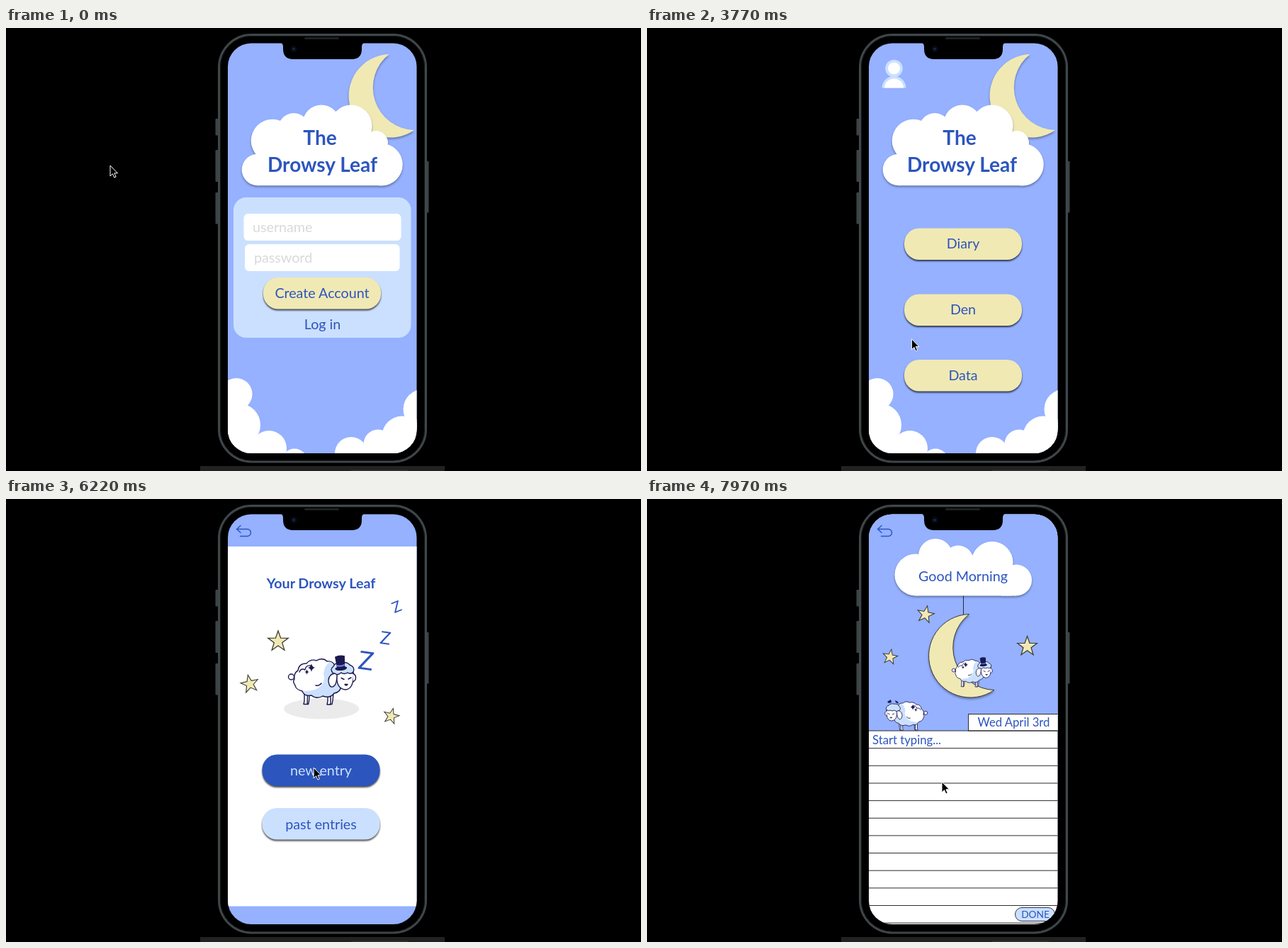
An HTML page for the animation above (8000 ms loop, 896x625 px).

```html
<!DOCTYPE html>
<html lang="en">
<head>
<meta charset="utf-8">
<title>Sleep journal prototype</title>
<style>
html, body { margin: 0; width: 100%; height: 100%; overflow: hidden; background: #000; }
svg { display: block; width: 896px; height: 625px; }
text { font: 19.7px Lato, sans-serif; fill: #2c55be; }
.mid { text-anchor: middle; }
.title { font-size: 28px; font-weight: 700; }
.small { font-size: 16.7px; }
.sky { fill: #95b1ff; }
.pale { fill: #cbe0ff; }
.cream { fill: #f1e9b4; }
.cloud { fill: #fff; }
.soft { filter: drop-shadow(0 2px 1.5px rgba(0, 0, 0, .35)); }
.btn rect { width: 166px; height: 44.5px; rx: 21px; fill: #f1e9b4; filter: drop-shadow(0 2px 1px rgba(0, 0, 0, .7)); }
.btn text { text-anchor: middle; }
.btn.hover rect { fill: #9747ff; }
.btn.hover text { fill: #f5ecd8; }
.btn.light rect { fill: #cbe0ff; }
.btn.light.hover rect { fill: #2c55be; }
.btn.light.hover text { fill: #cbe0ff; }
.hint { fill: #d9d9d9; }
.ink { fill: none; stroke: #1b1950; stroke-width: 1.4; stroke-linecap: round; stroke-linejoin: round; }
.star { fill: #f1e9b4; stroke: #3a3a34; stroke-width: .085; }
.rule { stroke: #2b2b33; stroke-width: 1; }
</style>
</head>
<body>
<svg viewBox="0 0 896 625" xmlns="http://www.w3.org/2000/svg">
  <defs>
    <clipPath id="glass"><rect x="313" y="21.5" width="266.5" height="578.5" rx="33"/></clipPath>
    <path id="moon" d="M540.5 37A58.800 58.800 0 1 0 576 144A60 60 0 0 1 540.5 37Z"/>
    <polygon id="star" points="0,-1 .24,-.32 .95,-.31 .38,.12 .59,.81 0,.4 -.59,.81 -.38,.12 -.95,-.31 -.24,-.32"/>
    <path id="back" d="M331 37.5L325.5 42.5L331 47.5M326 42.5H340.5a5 5 0 0 1 0 10H330.5" fill="none" stroke="#2c55be" stroke-width="1.4" stroke-linecap="round"/>
    <path id="fleece" d="M407 254q-1-9 5-12q1-10 12-10q6-7 14-4q9-5 15 1q8-1 11 6L474 262q-2 11-11 12q-6 8-16 4q-9 5-16-1q-10 2-13-6q-9-2-10-8q-4-5-1-9Z"/>
    <g id="sheep">
      <g class="ink" style="fill:#fff">
        <path d="M421 275v10l-1 4.500h5l.5-12M428 277l-.5 8-1 4.500h-2M454 276v9l-1 5h5v-13M462 274l-1 10-1 5.500h-3"/>
        <circle cx="402.5" cy="251" r="4"/>
      </g>
      <use href="#fleece" fill="#fff"/>
      <path class="pale" d="M419 271q17 1 26-8q6-8 3-16q1-12 9-17l7 5L474 262q-2 11-11 12q-6 8-16 4q-9 5-16-1q-8 1-12-6Z"/>
      <use href="#fleece" class="ink"/>
      <path class="ink" d="M414 244q2-6 8-3q1-7 8-6M437 263q5 1 8-3"/>
      <path fill="#1b1950" d="M431 232q.8 5 5 6q-4.200 1-5 6q-.8-5-5-6q4.200-1 5-6ZM424.500 240q.5 3.500 3 4q-2.500.5-3 4q-.5-3.500-3-4q2.500-.5 3-4Z"/>
      <path class="ink" style="fill:#fff" d="M467 242q-3 26 12 27q13-1 11-27Z"/>
      <path class="ink" style="fill:#cbe0ff" d="M462 246q-6-5 0-10q3-6 10-5q9-2 13 3q8 3 5 10q-4 4-8 1q-5 3-9 0q-6 5-11 1Z"/>
      <path class="ink" style="fill:#fff" d="M464 246q-9 1-9 11q1 9 6 8q6-2 6-17ZM489 246q6 2 4 9l-3 3"/>
      <path class="ink" d="M473 252.500l4 2M487 252l-4 2M478 261.500q2 3 4 0Z"/>
    </g>
    <g id="hat" fill="#1b1950" transform="rotate(-6 472 232)">
      <ellipse cx="472" cy="239" rx="8.5" ry="3"/>
      <path d="M465 222q7-3 14 0l-1.500 16h-11Z"/>
      <path d="M466.500 234.500q5.500 2.500 11 0" fill="none" stroke="#6f86ea" stroke-width="2"/>
    </g>
    <g id="night">
      <rect class="sky" x="312" y="20" width="269" height="582"/>
      <use href="#moon" class="cream soft"/>
      <g class="cloud">
        <circle cx="325" cy="516.5" r="22.5"/><circle cx="329" cy="560" r="30"/>
        <circle cx="371" cy="593" r="25"/><circle cx="407" cy="612" r="18.5"/>
        <path d="M312 516h20l20 60v26h-40Z"/>
        <circle cx="589" cy="538" r="28.5"/><circle cx="559" cy="576" r="28.5"/>
        <circle cx="525" cy="587" r="20.5"/><circle cx="487" cy="600" r="23"/>
        <path d="M500 592h30l40-40h12v50h-82Z"/>
      </g>
      <g class="cloud soft">
        <circle cx="355" cy="200" r="22.3"/><circle cx="530" cy="192.7" r="29.7"/>
        <circle cx="376" cy="159" r="30.3"/><circle cx="406" cy="142" r="22"/>
        <circle cx="445" cy="135" r="26.5"/><circle cx="487" cy="138" r="29.5"/>
        <circle cx="522" cy="162" r="17"/>
        <path d="M355 185L376 150H510L530 180V222.3H355Z"/>
      </g>
    </g>
  </defs>

  <rect width="896" height="625"/>
  <g fill="#3c4346">
    <rect x="295.5" y="128" width="4" height="23.5" rx="1"/>
    <rect x="295.5" y="172" width="4" height="45" rx="1"/>
    <rect x="295.5" y="232" width="4" height="44.5" rx="1"/>
    <rect x="592.5" y="188" width="4" height="72.5" rx="1"/>
  </g>
  <rect x="300.5" y="9.5" width="292" height="602.5" rx="46" stroke="#3f4749" stroke-width="3"/>
  <rect x="302.5" y="11.5" width="288" height="598.5" rx="44" fill="none" stroke="#14181a"/>
  <rect x="274" y="618" width="345" height="7" fill="#222"/>
  <rect x="487" y="623.5" width="80" height="2" fill="#333"/>

  <g clip-path="url(#glass)">
    <g id="login">
      <use href="#night"/>
      <text class="title mid" x="443" y="165">The</text>
      <text class="title mid" x="446.5" y="203">Drowsy Leaf</text>
      <rect x="321" y="239" width="250.5" height="198" rx="18" class="pale"/>
      <g id="blank">
        <rect class="cloud" x="335.5" y="262" width="222" height="38" rx="6"/>
        <rect class="cloud" x="337" y="305" width="218.5" height="38" rx="6"/>
        <text class="hint" x="348" y="288">username</text>
        <text class="hint" x="350" y="331">password</text>
        <text class="mid" x="446.5" y="425">Log in</text>
      </g>
      <g id="filled">
        <rect class="cloud" x="337.5" y="262" width="217" height="38" rx="6"/>
        <rect class="cloud" x="337.5" y="305" width="217" height="38" rx="6"/>
        <text x="350" y="288">user</text>
        <text x="350" y="332" style="font-size:18px">***********</text>
        <text class="mid" x="445" y="425">Log in</text>
      </g>
      <g class="btn" id="create" data-y="352"><rect x="363" y="352"/><text x="446" y="380.5">Create Account</text></g>
    </g>

    <g id="menu">
      <use href="#night"/>
      <text class="title mid" x="441" y="165">The</text>
      <text class="title mid" x="444.5" y="203">Drowsy Leaf</text>
      <circle class="pale" cx="348.5" cy="57" r="12.3"/>
      <circle class="cloud" cx="348.5" cy="57" r="8.5"/>
      <path class="pale" d="M331.500 84.500a17 16.500 0 0 1 34 0Z"/>
      <path class="cloud" d="M335 84.500a13.500 13 0 0 1 27 0Z"/>
      <g class="btn" data-y="282.5"><rect x="363" y="282.5"/><text x="446" y="311">Diary</text></g>
      <g class="btn" data-y="375.5"><rect x="363" y="375.5"/><text x="446" y="404">Den</text></g>
      <g class="btn" data-y="468"><rect x="363" y="468"/><text x="446" y="496.5">Data</text></g>
    </g>

    <g id="diary">
      <rect class="sky" x="312" y="20" width="269" height="582"/>
      <rect class="cloud" x="312" y="67" width="269" height="507.5"/>
      <use href="#back"/>
      <text class="mid" x="444.5" y="125.5" style="font-weight:700">Your Drowsy Leaf</text>
      <g class="star">
        <use href="#star" transform="translate(384 201) scale(15)"/>
        <use href="#star" transform="translate(344 261) rotate(-12) scale(13)"/>
        <use href="#star" transform="translate(543.5 306.5) rotate(14) scale(11.5)"/>
      </g>
      <text class="mid" transform="translate(508 228) rotate(8)" y="13" style="font-size:36px">Z</text>
      <text class="mid" transform="translate(535.5 196) rotate(8)" y="9" style="font-size:25px">Z</text>
      <text class="mid" transform="translate(551 152) rotate(-22)" y="7.5" style="font-size:21px">Z</text>
      <ellipse cx="445" cy="296" rx="53" ry="14.5" fill="#ebebeb"/>
      <use href="#sheep"/><use href="#hat"/>
      <g class="btn light" data-y="360.5"><rect x="361.5" y="360.5"/><text x="444.5" y="390">new entry</text></g>
      <g class="btn light" data-y="436"><rect x="361.5" y="436"/><text x="444.5" y="465.5">past entries</text></g>
    </g>

    <g id="entry">
      <rect class="cloud" x="312" y="20" width="269" height="582"/>
      <rect class="sky" x="312" y="20" width="269" height="307"/>
      <use href="#back"/>
      <path class="rule" d="M446.500 136V163"/>
      <g class="cloud soft">
        <circle cx="379" cy="107" r="29.5"/><circle cx="407" cy="80" r="24"/>
        <circle cx="439" cy="87" r="21.5"/><circle cx="487" cy="89.5" r="29.5"/>
        <circle cx="521" cy="114.5" r="22"/>
        <rect x="379" y="85" width="136" height="51.5"/><rect x="500" y="110" width="21" height="26.5"/>
      </g>
      <text class="mid" x="446" y="116">Good Morning</text>
      <use href="#moon" class="cream soft" transform="translate(-86 125.5)" stroke="#3a3a34"/>
      <g class="star">
        <use href="#star" transform="translate(393 163) rotate(12) scale(12.5)"/>
        <use href="#star" transform="translate(343 223) rotate(10) scale(11)"/>
        <use href="#star" transform="translate(536.5 208) scale(14.5)"/>
      </g>
      <g transform="translate(191.2 91) scale(.6)"><use href="#sheep"/><use href="#hat"/></g>
      <use href="#sheep" transform="translate(646.7 143.7) scale(-.63 .63)"/>
      <path fill="#1b1950" d="M339 286l5-3 1 4-4 1ZM350 284l4 2 1 3-4-2Z"/>
      <rect class="cloud rule" x="453.5" y="303.5" width="130" height="23.5"/>
      <text class="mid small" x="517.5" y="321">Wed April 3rd</text>
      <g id="lines" class="rule"></g>
      <text class="small" x="318" y="346">Start typing...</text>
      <rect x="519.5" y="576.5" width="56" height="19" rx="9.5" class="pale" stroke="#2b3550"/>
      <text class="mid" x="548" y="591" style="font-size:13.7px">DONE</text>
    </g>
  </g>

  <path d="M386 20.500q5 .5 5 6v3q0 14.500 14 14.500h83q14 0 14-14.500v-3q0-5.500 5-6Z"/>
  <rect x="421" y="13" width="49" height="3" rx="1.5" fill="#1d2022"/>
  <circle cx="406" cy="29.5" r="4.5" fill="#070b16"/><circle cx="406" cy="29.5" r="1.6" fill="#14305c"/>

  <path id="arrow" d="M0 0V15L3.500 11.700L5.800 17L8.200 16L5.900 10.800H10.500Z" stroke="#fff" stroke-width="1"/>
  <circle id="touch" r="19.3" fill="#fff" fill-opacity=".42" stroke="#fff" stroke-opacity=".75"/>
</svg>
<script>
const $ = id => document.getElementById(id);
const LOOP = 8000, STEP = 79.7;

// start time of each screen
const screens = [['login', 0], ['menu', 2780], ['diary', 4930], ['entry', 6830]];
const FILLED = 1500;
const taps = [[1340, 1500], [2620, 2780], [4770, 4930], [6680, 6830]];

// pointer path: time, x, y
const path = [
  [0, 147, 194], [160, 251, 314], [400, 251, 314], [700, 350, 352], [1000, 415, 372],
  [1270, 431, 376], [1860, 431, 376], [2300, 436, 395], [2560, 441, 428], [3300, 441, 428],
  [3450, 425, 412], [3600, 400, 425], [3770, 369, 441], [4000, 345, 430], [4160, 333, 404],
  [4300, 350, 395], [4450, 385, 380], [4620, 415, 310], [4710, 420.5, 294], [5200, 420.5, 294],
  [5600, 428, 345], [6060, 440, 379], [6220, 434, 379], [6380, 416, 377], [6540, 430, 378],
  [7030, 430, 378], [7570, 405, 354], [7970, 416, 399]
];

$('lines').innerHTML = Array.from({ length: 12 }, (_, i) => {
  const y = 327 + i * 24.65;
  return `<path d="M312 ${y}H581"/>`;
}).join('');

const show = (el, on) => { el.style.display = on ? '' : 'none'; };

function pointer(t) {
  const i = path.findIndex(p => p[0] > t);
  if (i < 0) return path[path.length - 1].slice(1);
  const [a, b] = [path[i - 1], path[i]];
  const k = (t - a[0]) / (b[0] - a[0]);
  return [a[1] + (b[1] - a[1]) * k, a[2] + (b[2] - a[2]) * k];
}

function draw(now) {
  const t = Math.floor((now % LOOP) / STEP + .07) * STEP;
  const [x, y] = pointer(t);
  const filled = t >= FILLED;
  const current = screens.filter(s => t >= s[1]).pop()[0];
  const tapping = taps.some(([from, to]) => t >= from && t < to);

  for (const [id] of screens) show($(id), id === current);
  show($('blank'), !filled);
  show($('filled'), filled);
  $('create').setAttribute('transform', `translate(0 ${filled ? 2 : 0})`);

  for (const b of document.querySelectorAll('.btn')) {
    const top = +b.dataset.y;
    b.classList.toggle('hover', x > 363 && x < 529 && y > top && y < top + 45);
  }
  for (const id of ['arrow', 'touch']) $(id).setAttribute('transform', `translate(${x} ${y})`);
  show($('arrow'), !tapping);
  show($('touch'), tapping);
}

function tick() {
  draw(performance.now());
  requestAnimationFrame(tick);
}
tick();
</script>
</body>
</html>
```
